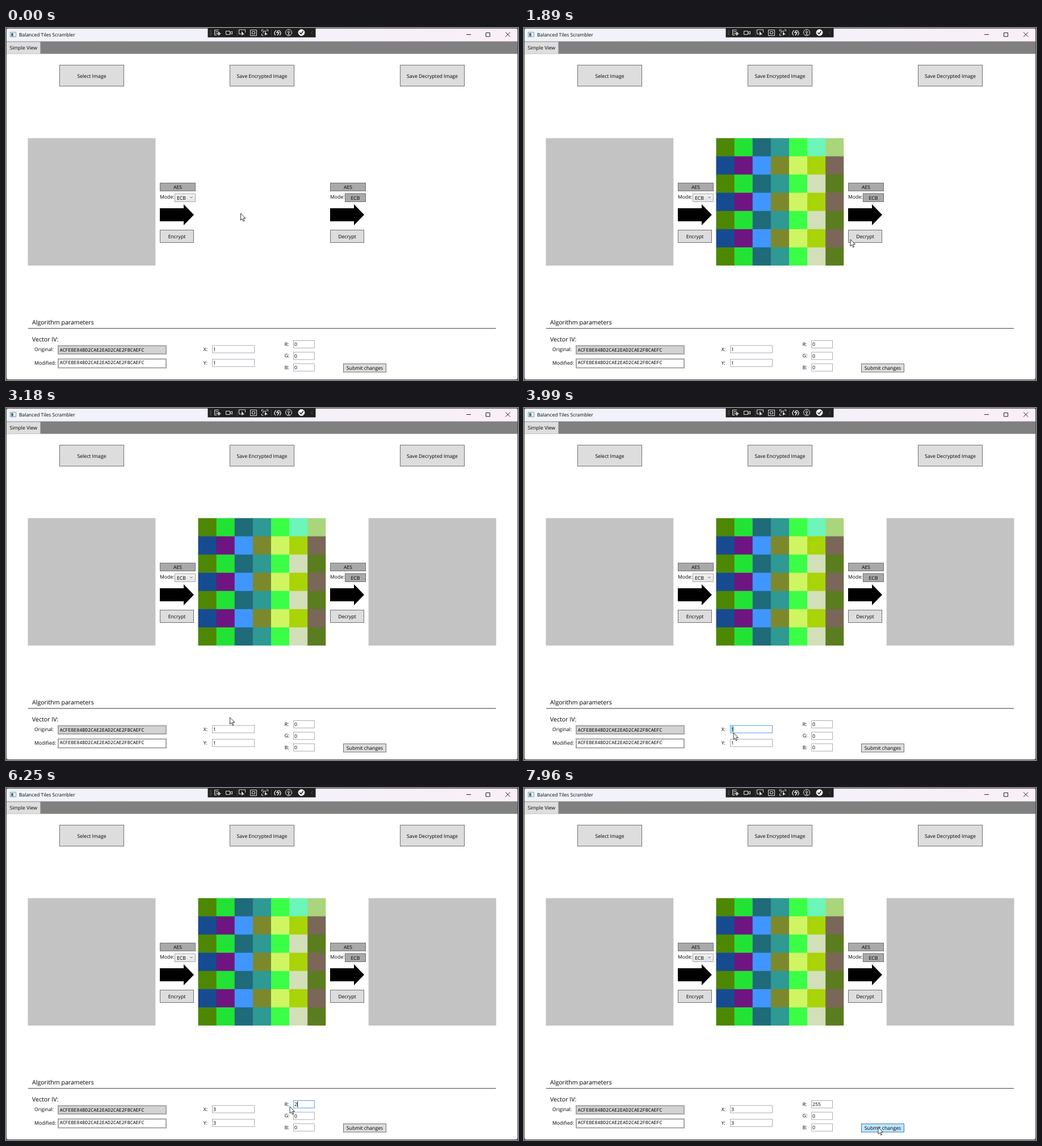
These frames come from a looping animation (902 by 621 pixels, 8000 ms). An HTML page:

```html
<!DOCTYPE html>
<html lang="en">
<head>
<meta charset="utf-8">
<title>Tile scrambler demo</title>
<style>
  html, body { margin: 0; width: 100%; height: 100%; overflow: hidden; background: #4a4a4a; }
  svg { display: block; width: 902px; height: 621px; }
  text { font: 8.68px "Open Sans", "Noto Sans", sans-serif; white-space: pre; text-rendering: geometricPrecision; }
  .big { font-size: 10.6px; }
  .title { font-size: 8.5px; }
  .mono { font: 8.27px "Noto Sans Mono", "DejaVu Sans Mono", monospace; }
  .icons { fill: none; stroke: #e4e4e4; stroke-width: 1; }
  .icons .solid { fill: #e4e4e4; stroke: none; }
</style>
</head>
<body>
<svg id="stage" viewBox="0 0 902 621">
  <defs>
    <linearGradient id="bar"><stop stop-color="#eff4fa"/><stop offset=".5" stop-color="#f3f1fa"/><stop offset="1" stop-color="#faeff7"/></linearGradient>
    <linearGradient id="combo" x2="0" y2="1"><stop stop-color="#f1f1f1"/><stop offset="1" stop-color="#e4e4e4"/></linearGradient>
    <clipPath id="win"><rect x="1" y="1" width="900" height="619" rx="3"/></clipPath>
  </defs>
  <g clip-path="url(#win)">
    <rect width="902" height="621" fill="#fff"/>
    <rect width="902" height="24" fill="url(#bar)"/>
    <rect y="23.600" width="902" height="22" fill="#808080"/>
    <rect x="1" y="24.500" width="59.500" height="21" fill="#dedede"/>
  </g>
  <!-- window icon and buttons -->
  <path d="M7.500 7.500h10v8h-10z" fill="#fff" stroke="#8a8f96"/>
  <path d="M9 9h4v5.500h-4z" fill="#3d7c8f"/>
  <path d="M811 11.500h8M845.500 8.500h7v6.500h-7zM880 7.500l8 8M888 7.500l-8 8" fill="none" stroke="#222"/>
  <!-- floating tool strip -->
  <path d="M355.500 0h190v16.500h-190z" fill="#1f1f1f"/>
  <g class="icons">
    <path d="M359.500 4v9M361.500 4v9" stroke="#777" stroke-dasharray="1 1"/>
    <path d="M407.500 3v11M467.500 3v11" stroke="#444"/>
    <path d="M367 3.500h8M367.500 3.500v9h4M369 6.500h5M369 9.500h2"/>
    <path d="M375 6.500v7M371.500 10h7"/><circle cx="375" cy="10" r="2"/>
    <path d="M387.500 5.500h7v6h-7zM394.500 8l4-2v5l-4-2"/>
    <path d="M414 10.500h-3.500v-7.500h11v5"/><path class="solid" d="M415 5.500v8l2-2h3z"/>
    <path d="M430.500 3.500h11v10h-11zM433.500 6.500h5v4h-5z"/>
    <path d="M450.500 6v-3h3M458.500 3h3v3M453.500 13h-3v-3M453 9.500v-4h6"/><path class="solid" d="M456 6.500v7l2-2h3z"/>
    <path d="M476 4c-4 3-4 7-1 9M481 4c4 3 4 7 1 9M480 4l-3 4h4l-3 5" stroke-width="1.500"/>
    <circle cx="498" cy="8" r="5.500"/><path d="M498 4v1.500M495 7h6M498 7v2.500l-1.500 3M498 9.500l1.500 3"/>
    <circle cx="520.500" cy="8" r="5.500" fill="#fff"/><path d="M517.500 8l2.200 2.500 4-5" stroke="#1f1f1f" stroke-width="1.500"/>
    <path d="M540.500 5.500l-3 3 3 3" stroke="#555"/>
  </g>
</svg>
<script>
const stage = document.getElementById('stage');
const LOOP = 8000, TICK = 70;

function add(tag, attrs, parent = stage) {
  const el = document.createElementNS('http://www.w3.org/2000/svg', tag);
  for (const k in attrs) el.setAttribute(k, attrs[k]);
  return parent.appendChild(el);
}
const rect = (x, y, width, height, fill, more) => add('rect', { x, y, width, height, fill, ...more });
function label(x, y, str, more) {
  const el = add('text', { x, y, ...more });
  el.textContent = str;
  return el;
}
const show = (el, on) => el.setAttribute('visibility', on ? 'visible' : 'hidden');
const hit = (b, [x, y]) => x > b.x && x < b.x + b.w && y > b.y && y < b.y + b.h - 1;

function button(x, y, w, h, str, fill = '#ddd') {
  const box = rect(x + .5, y + .5, w - 1, h - 1, fill, { stroke: '#707070' });
  label(x + w / 2, y + h / 2 + 3.5, str, { 'text-anchor': 'middle' });
  return { box, x, y, w, h };
}

function field(name, x, y, w, value) {
  const h = 14;
  label(x - 15.3, y + 10, name);
  const box = rect(x + .5, y + .5, w - 1, h - 1, '#fff', { stroke: '#abadb3' });
  const mark = rect(x + 2, y + 1.5, 5, h - 3, '#0078d7', { opacity: .42 });
  const text = label(x + 2, y + 10.4, value);
  const caret = rect(x + 7, y + 2, 1, h - 4, '#000');
  show(mark, false);
  show(caret, false);
  return { box, mark, text, caret, x, y, w, h };
}

// Static layout
label(23, 15, 'Balanced Tiles Scrambler', { class: 'title' });
label(6.5, 38.4, 'Simple View');
['Select Image', 'Save Encrypted Image', 'Save Decrypted Image']
  .forEach((s, i) => button(94 + 300 * i, 65, 114, 38, s));

const picture = x => rect(x, 194.3, 224.8, 224.8, '#c3c3c3');
picture(38.5);
const [encrypt, decrypt] = ['Encrypt', 'Decrypt'].map((s, i) => {
  const x = 271 + 300 * i;
  button(x, 273, 63, 15, 'AES', '#a9a9a9');
  label(x, 301.3, 'Mode:');
  add('path', { d: `M${x} 318h42v-7l18 18.500-18 18.500v-7h-42z` });
  return button(x, 356, 60, 23, s);
});
rect(297.5, 292.5, 36, 14, 'url(#combo)', { stroke: '#acacac' });
label(301, 302.8, 'ECB');
add('path', { d: 'M324.500 297.800l2 2 2-2', fill: 'none', stroke: '#555' });
button(597, 291.5, 37, 15.5, 'ECB', '#a9a9a9');

label(46, 522.8, 'Algorithm parameters', { class: 'big' });
rect(39, 529.5, 824, 1, '#333');
label(46, 552.8, 'Vector IV:', { class: 'big' });
['Original:', 'Modified:'].forEach((s, i) => {
  const y = 560.5 + i * 23.5;
  label(50, y + 9.5, s);
  rect(92, y, 190, 14.5 + i, i ? '#fff' : '#d3d3d3', { stroke: '#a5a5a8', 'stroke-width': 2 });
  label(94.7, y + 10 - i * .6, 'ACFEBE84BD2CAE2EAD2CAE2FBCAEFC', { class: 'mono' });
});
const [fieldX, fieldY] = ['X:', 'Y:'].map((s, i) => field(s, 363, 559.6 + i * 24.2, 75, '1'));
const [fieldR] = ['R:', 'G:', 'B:'].map((s, i) => field(s, 506, 551 + i * 20.4, 38, '0'));
const fields = [fieldX, fieldY, fieldR];
const submit = button(594, 592, 76, 15.5, 'Submit changes');
const buttons = [encrypt, decrypt, submit];

// Encrypted blocks: two rows alternate, the top one ends differently
const even = ['#4d8704', '#22e236', '#1f6b7a', '#2f9994', '#3bff47', '#d3dfb8', '#5b7d20'];
const odd = ['#174b91', '#6f1582', '#4096ff', '#7b892c', '#d0f562', '#a9d408', '#7a6758'];
const top0 = [...even.slice(0, 5), '#6cf6b9', '#aad57c'];
const cipher = add('g', {});
const cell = 224.8 / 7;
for (let r = 0; r < 7; r++) {
  (r === 0 ? top0 : r % 2 ? odd : even).forEach((fill, c) => add('rect', {
    x: 338.5 + c * cell, y: 194.3 + r * cell, width: cell + (c < 6), height: cell + (r < 6), fill
  }, cipher));
}
const plain = picture(638.7);

// Pointer
const pointer = add('g', {});
const glow = add('circle', { r: 7.5, fill: '#fff03c', style: 'mix-blend-mode:multiply' }, pointer);
const arrow = add('path', {
  d: 'M0 0V12l2.700-2.600 1.900 4.500 1.900-.8-1.900-4.400 3.800-.1z',
  fill: '#fff', stroke: '#111', 'stroke-width': .85
}, pointer);
const beam = add('path', { d: 'M-2.500-6h2l.5.5.5-.5h2M0-5.500v11M-2.500 6h2l.5-.5.5.5h2', fill: 'none', stroke: '#222' }, pointer);

// Pointer moves: start, end, x, y
const moves = [
  [380, 1000, 288, 376],
  [1380, 1890, 575, 373], [1890, 2100, 594, 374],
  [2570, 3300, 370, 567],
  [3800, 3990, 369, 573], [3990, 4270, 350, 604],
  [4500, 4800, 370, 593], [4970, 5090, 347, 591],
  [5330, 5780, 510, 558],
  [5920, 6060, 476, 563], [6060, 6230, 500, 562], [6230, 6740, 564, 566],
  [6740, 6950, 560, 548], [6950, 7560, 622, 593], [7600, 7700, 624, 598.5]
];
// Each field gets a double click, then typing over the selection
const edits = [
  { click: 3520, type: 4350, text: '3' },
  { click: 4880, type: 5290, text: '3' },
  { click: 5840, type: 6180, text: '255' }
];
const ENCRYPT = 1060, DECRYPT = 2300, SUBMIT = 7690;
const SHOWN = 1220, RESTORED = 2360, DOUBLE = 140;
const presses = [ENCRYPT, DECRYPT, SUBMIT];
const clicks = [...presses, ...edits.flatMap(e => [e.click, e.click + TICK])];

function place(time) {
  const t = Math.round(time / TICK) * TICK;
  let x = 413.5, y = 327;
  for (const [start, end, toX, toY] of moves) {
    const u = Math.min(1, Math.max(0, (t - start) / (end - start)));
    const e = u * u * (3 - 2 * u);
    x += (toX - x) * e;
    y += (toY - y) * e;
  }
  return [x, y];
}

function paint(b, fill, stroke) {
  b.box.setAttribute('fill', fill);
  b.box.setAttribute('stroke', stroke);
}

function draw(t) {
  const now = place(t), felt = place(t - TICK);  // the window reacts one tick late
  const during = start => t >= start && t < start + TICK;

  show(cipher, t >= SHOWN);
  show(plain, t >= RESTORED);
  buttons.forEach((b, i) => {
    if (!hit(b, felt)) paint(b, '#ddd', '#707070');
    else if (during(presses[i])) paint(b, '#c4e5f6', '#2c628b');
    else paint(b, '#bee6fd', '#3c7fb1');
  });

  edits.forEach((e, i) => {
    const f = fields[i], blur = i < 2 ? edits[i + 1].click : SUBMIT;
    const focused = t >= e.click && t < blur;
    const typing = t >= e.type;
    const count = Math.min(e.text.length, Math.floor((t - e.type) / 100) + 1);
    const since = t - e.type - (e.text.length - 1) * 100;
    const lit = since < 0 || Math.floor(since / 530) % 2 === 0;
    f.text.textContent = typing ? e.text.slice(0, count) : i < 2 ? '1' : '0';
    paint(f, '#fff', focused ? '#569de5' : hit(f, felt) ? '#7eb4ea' : '#abadb3');
    show(f.mark, focused && !typing && t >= e.click + DOUBLE);
    show(f.caret, focused && typing && lit);
    f.caret.setAttribute('x', f.x + 2 + count * 5);
  });

  const overText = fields.some(f => hit(f, now));
  pointer.setAttribute('transform', `translate(${now.map(v => v.toFixed(2))})`);
  show(beam, overText);
  show(arrow, !overText);
  show(glow, clicks.some(during));
}

const began = performance.now();
function tick() {
  draw((performance.now() - began) % LOOP);
  requestAnimationFrame(tick);
}
tick();
</script>
</body>
</html>
```
